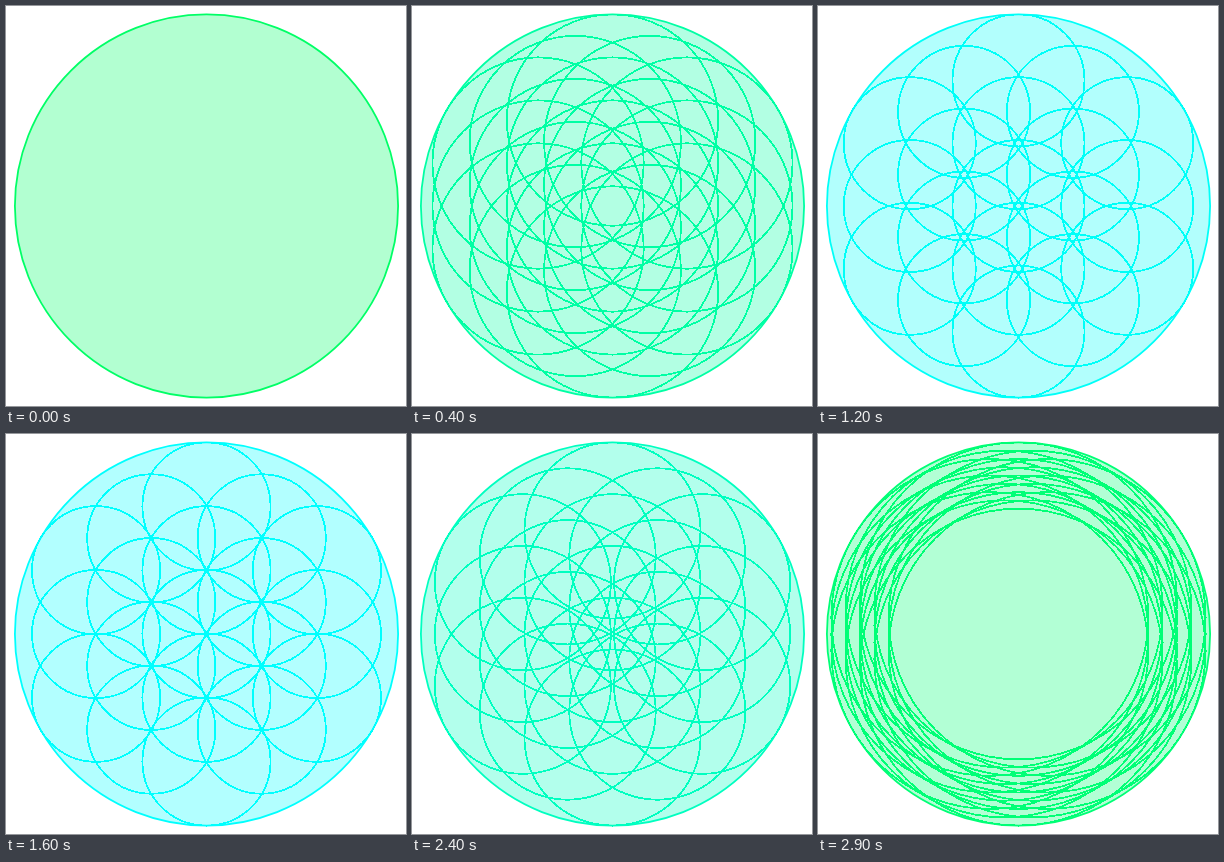
Recreate the animation shown at these times as an HTML page. Size 400x400 px, loop 3000 ms.

```html
<!DOCTYPE html>
<html lang="en">
<head>
<meta charset="utf-8">
<title>Circle lattice</title>
<style>
  html, body { margin: 0; width: 100%; height: 100%; overflow: hidden; background: #fff; }
  svg { display: block; stroke: currentColor; stroke-width: 1.8; }
  #rim { fill: currentColor; fill-opacity: 0.3; }
  #lattice { fill: none; shape-rendering: crispEdges; }
</style>
</head>
<body>
<svg id="stage" width="400" height="400" viewBox="-200.5 -200 400 400">
  <circle id="rim"/>
  <g id="lattice"></g>
</svg>
<script>
const LOOP = 3000, STEP = 100, RADIUS = 191.6;
const stage = document.getElementById('stage');
const rim = document.getElementById('rim');
const lattice = document.getElementById('lattice');
rim.setAttribute('r', RADIUS);

// Hexagonal lattice: every point within two spacings of the middle.
const rings = [];
for (let q = -2; q <= 2; q++) {
  for (let s = -2; s <= 2; s++) {
    if (Math.abs(q + s) > 2) continue;
    const node = document.createElementNS('http://www.w3.org/2000/svg', 'circle');
    lattice.append(node);
    rings.push({ node, x: q * Math.sqrt(3) / 2, y: s + q / 2 });
  }
}

function draw(time) {
  const t = Math.floor((time % LOOP) / STEP) * STEP;
  const spread = Math.sin(Math.PI * t / LOOP);
  const r = RADIUS / (1 + 2 * spread); // outermost circles touch the rim
  const d = r * spread;

  stage.style.color = `hsl(${144 + 36 * spread}, 100%, 50%)`;
  lattice.style.display = t > 0 ? '' : 'none';
  for (const { node, x, y } of rings) {
    node.setAttribute('cx', x * d);
    node.setAttribute('cy', y * d);
    node.setAttribute('r', r);
  }
}

const start = performance.now();
function tick() {
  draw(performance.now() - start);
  requestAnimationFrame(tick);
}
tick();
</script>
</body>
</html>
```
